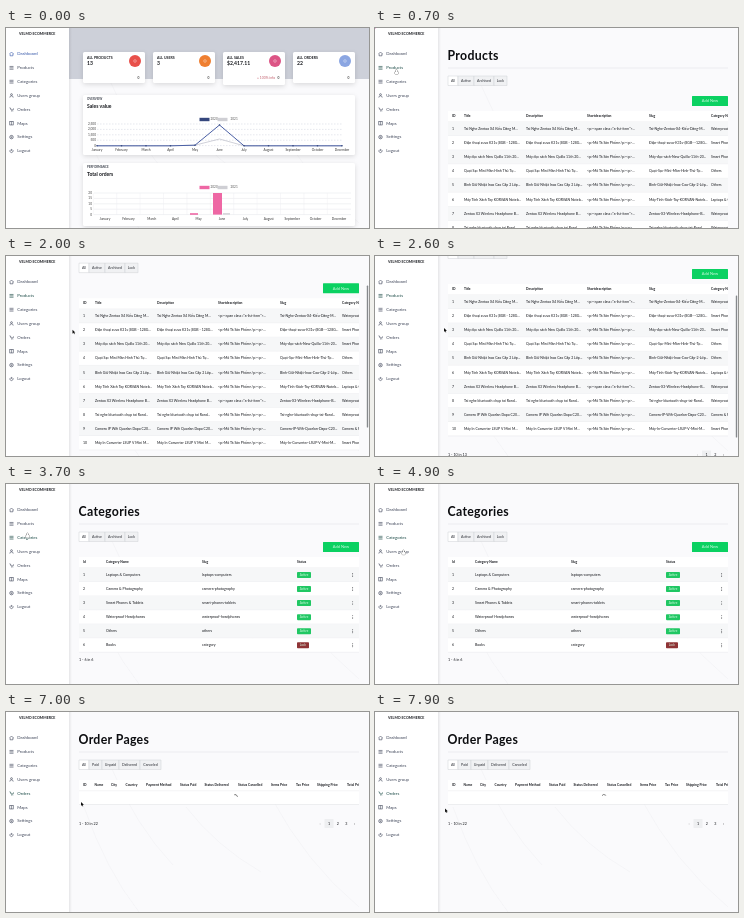
Write an HTML page with a canvas that moves like this. It is 363 px wide and 200 px high and loops after 8 s.

```html
<!DOCTYPE html>
<html lang="en">
<head>
<meta charset="utf-8">
<title>Shop admin</title>
<style>
html, body { margin: 0; height: 100%; overflow: hidden; background: #fff; }
canvas { display: block; width: 363px; height: 200px; }
</style>
</head>
<body>
<canvas id="stage"></canvas>
<script>
const LOOP = 8000, W = 363, H = 200;
const canvas = document.getElementById('stage');
const c = canvas.getContext('2d');
const dpr = window.devicePixelRatio || 1;
canvas.width = W * dpr;
canvas.height = H * dpr;

const INK = '#15171c', GREEN = '#0bd162', NAVY = '#35477d', PINK = '#ee67a4';

function text(s, x, y, size = 3.5, color = INK, weight = 400, align = 'left') {
  c.font = `${weight} ${size}px Lato, sans-serif`;
  c.fillStyle = color;
  c.textAlign = align;
  c.textBaseline = 'middle';
  c.fillText(s, x, y);
}
function box(x, y, w, h, color, r = 0) {
  c.fillStyle = color;
  c.beginPath();
  c.roundRect(x, y, w, h, r);
  c.fill();
}
function path(points, color, width = 0.5, dash = []) {
  c.strokeStyle = color;
  c.lineWidth = width;
  c.setLineDash(dash);
  c.beginPath();
  points.forEach(([x, y]) => c.lineTo(x, y));
  c.stroke();
  c.setLineDash([]);
}
function arc(x, y, r, color, width, from = 0, to = Math.PI * 2) {
  c.beginPath();
  c.arc(x, y, r, from, to);
  if (width) {
    c.strokeStyle = color;
    c.lineWidth = width;
    c.stroke();
  } else {
    c.fillStyle = color;
    c.fill();
  }
}
function panel(x, y, w, h) {
  c.shadowColor = '#0002';
  c.shadowBlur = 5 * dpr;
  c.shadowOffsetY = 1.5 * dpr;
  box(x, y, w, h, '#fff', 1.5);
  c.shadowColor = 'transparent';
}
const smooth = k => k * k * (3 - 2 * k);
const ramp = (t, from, to) => smooth(Math.min(1, Math.max(0, (t - from) / (to - from))));

function backdrop() {
  box(63, 0, 300, H, '#fafafc');
  for (const [x, y, dx, dy] of [[78, 95, 55, 105], [105, 55, 62, 98], [180, 95, 75, 65], [265, 85, 88, 110]]) {
    c.beginPath();
    c.moveTo(x, y);
    c.quadraticCurveTo(x + dx * 0.4, y + dy * 0.6, x + dx, y + dy);
    c.strokeStyle = '#f2f3f5';
    c.lineWidth = 0.7;
    c.stroke();
  }
}

const MENU = ['Dashboard', 'Products', 'Categories', 'Users group', 'Orders', 'Maps', 'Settings', 'Logout'];
function sidebar(active) {
  const shade = c.createLinearGradient(62, 0, 66, 0);
  shade.addColorStop(0, '#0000001c');
  shade.addColorStop(1, '#0000');
  box(62, 0, 4, H, shade);
  box(0, 0, 63, H, '#fff');
  text('VELMO ECOMMERCE', 13, 6, 3.6, INK, 700);
  MENU.forEach((name, i) => {
    const y = 26 + i * 13.85;
    const color = i !== active ? '#3f4659' : i ? '#1b4a46' : '#3456a8';
    icon(i, 5.5, y, color);
    text(name, 11.3, y, 4.3, color);
  });
}
function icon(i, x, y, color) {
  if (i === 0) path([[x - 2, y], [x, y - 2], [x + 2, y], [x + 1.4, y], [x + 1.4, y + 1.8], [x - 1.4, y + 1.8], [x - 1.4, y]], color, 0.6);
  else if (i === 1 || i === 2) for (const d of [-1.4, 0, 1.4]) path([[x - 2, y + d], [x + 2, y + d]], color, 0.6);
  else if (i === 3) {
    arc(x, y - 1, 0.9, color, 0.6);
    arc(x, y + 2, 1.7, color, 0.6, Math.PI, 0);
  } else if (i === 4) {
    path([[x - 2, y - 1.6], [x - 1, y - 1.4], [x - 0.5, y + 0.6], [x + 1.6, y + 0.6], [x + 2, y - 1]], color, 0.6);
    arc(x, y + 1.6, 0.4, color);
    arc(x + 1.4, y + 1.6, 0.4, color);
  } else if (i === 5) {
    c.strokeStyle = color;
    c.lineWidth = 0.6;
    c.strokeRect(x - 1.7, y - 1.7, 3.4, 3.4);
    path([[x, y - 1.7], [x, y + 1.7]], color);
  } else if (i === 6) {
    arc(x, y, 1.7, color, 0.7);
    arc(x, y, 0.6, color);
  } else {
    arc(x, y, 1.6, color, 0.6, -0.9, 4);
    path([[x, y - 2], [x, y]], color, 0.6);
  }
}

const MONTHS = 'January February March April May June July August September October December'.split(' ');
const CARDS = [
  ['ALL PRODUCTS', '13', '#e8504b'], ['ALL USERS', '3', '#ef7f31'],
  ['ALL SALES', '$2,417.11', '#dc5485'], ['ALL ORDERS', '22', '#8ba6e2']
];
function chart(y, h, kicker, title, color) {
  panel(77, y, 272, h);
  text(kicker, 81, y + 4.5, 2.9, '#3c414c', 700);
  text(title, 81, y + 11, 5, INK, 700);
  box(193.5, y + 22.8, 10, 3.4, color);
  text('2020', 204.5, y + 24.5, 3.1, '#555');
  box(211.5, y + 22.8, 10, 3.4, '#cfcfd4');
  text('2021', 224.5, y + 24.5, 3.1, '#555');
}
function dashboard() {
  box(63, 0, 300, 51, '#cdd0d9');
  CARDS.forEach(([label, value, color], i) => {
    const x = 77 + i * 70, hasTrend = i === 2;
    panel(x, 24, 62, hasTrend ? 33 : 31);
    text(label, x + 4, 29.6, 3.5, INK, 700);
    text(value, x + 4, 35, 5.1, INK, 700);
    arc(x + 52, 33, 6, color);
    arc(x + 52, 33, 1.3, '#fff8', 0.7);
    if (hasTrend) text('+ 100% info', x + 34, 49.5, 3.4, '#c25f6d');
    text('0', x + 54.5, 49.5, 3.3, '#444', 700);
  });

  chart(67, 60, 'OVERVIEW', 'Sales value', NAVY);
  ['2,500', '2,000', '1,500', '500', '0'].forEach((label, i) => {
    const y = 96 + i * 5.4;
    text(label, 90, y, 3.2, '#444', 400, 'right');
    path([[91, y], [337, y]], '#d5d8e2', 0.6, [1.5, 1.5]);
  });
  const px = i => 91 + i * 24.5;
  const line = peak => MONTHS.map((_, i) => [px(i), i === 5 ? peak : i === 4 ? 117.2 : 117.8]);
  path(line(111), '#c4c6d0', 0.8);
  path(line(97), '#4b60a5', 1);
  MONTHS.forEach((m, i) => {
    arc(px(i), line(97)[i][1], 0.8, NAVY);
    text(m, px(i), 122, 3.2, '#333', 400, 'center');
  });

  chart(135, 63, 'PERFORMANCE', 'Total orders', PINK);
  for (let i = 0; i < 5; i++) {
    const y = 165 + i * 5.4;
    text(20 - i * 5, 86, y, 3.2, '#444', 400, 'right');
    path([[88, y], [345, y]], '#e3e4e8');
  }
  MONTHS.forEach((m, i) => {
    const x = 99 + i * 23.4;
    path([[x - 11.7, 165], [x - 11.7, 187]], '#eeeff2');
    text(m, x, 191, 3.2, '#333', 400, 'center');
  });
  box(184, 185.2, 8, 1.6, PINK);
  box(207, 165, 9, 21.6, PINK);
  box(217, 185.2, 7, 1.4, '#cfcfd4');
}

function heading(title, tabs) {
  c.letterSpacing = '0.3px';
  text(title, 72.5, 28, 12.3, '#0c0d10', 700);
  c.letterSpacing = '0px';
  path([[73, 40], [353, 40]], '#dddfe3');
  tabs.forEach(([name, x, w], i) => {
    box(x, 48, w, 9.5, i ? '#f0f1f3' : '#fff');
    path([[x, 48], [x + w, 48], [x + w, 57.5], [x, 57.5], [x, 48]], '#cfd1d5');
    text(name, x + w / 2, 53, 3.6, '#292c33', 400, 'center');
  });
}
const STATES = [['All', 73, 10], ['Active', 83, 16], ['Archived', 99, 20], ['Lock', 119, 13]];
function addButton(y) {
  box(317, y, 36, 10, GREEN, 0.5);
  text('Add New', 335, y + 5.2, 4, '#d9fbe6', 400, 'center');
}
function tableHead(y, columns) {
  box(73, y - 5, 280, 11.5, '#fff');
  columns.forEach(([name, x]) => text(name, x, y, 3.3, INK, 700));
  path([[73, y + 6], [353, y + 6]], '#dcdee2');
}
function stripe(i, y) {
  box(73, y - 7, 280, 14, i % 2 ? '#fff' : '#f6f7f8');
  path([[73, y + 7], [353, y + 7]], '#e4e5e8');
  text(i + 1, 77, y, 3.5);
}
function pager(y, range, pages, x) {
  text(range, 73, y, 3.7);
  if (!pages) return;
  box(x - 4, y - 4.5, 9, 9, '#eeeff1');
  text('‹', x - 8.5, y, 4, '#888', 400, 'center');
  for (let i = 0; i < pages; i++) text(i + 1, x + 0.5 + i * 8.7, y, 3.7, INK, 400, 'center');
  text('›', x + pages * 8.7, y, 4, INK, 400, 'center');
}

const PRODUCTS = [
  ['Tai Nghe Zentoa X4 Kiểu Dáng M', 'Waterproof'],
  ['Điện thoại zuvo K31s (8GB - 128G', 'Smart Phones'],
  ['Máy đọc sách New Quillo 11th 20', 'Smart Phones'],
  ['Quạt Sạc Mini Màn Hình Thú Tự', 'Others'],
  ['Bình Giữ Nhiệt Inox Cao Cấp 2 Lớp', 'Others'],
  ['Máy Tính Xách Tay KORVAN Noteb', 'Laptops & C'],
  ['Zentoa X3 Wireless Headphone B', 'Waterproof'],
  ['Tai nghe bluetooth chụp tai Rond', 'Waterproof'],
  ['Camera IP Wifi Quorlan Dapo C20', 'Camera & P'],
  ['Máy In Converter LSUP V Mini M', 'Smart Phones']
];
function products(scroll) {
  c.save();
  c.beginPath();
  c.rect(63, 0, 290, H);
  c.clip();
  c.translate(0, -scroll);
  heading('Products', STATES);
  addButton(68);
  tableHead(88, [['ID', 77], ['Title', 89], ['Description', 151], ['Shortdescription', 212], ['Slug', 274], ['Category Name', 336]]);
  PRODUCTS.forEach(([name, category], i) => {
    const y = 101 + i * 14.1;
    stripe(i, y);
    text(name + '...', 89, y, 3.5);
    text(name + '...', 151, y, 3.5);
    text(i % 6 ? '<p>Mô Tả Sản Phẩm</p><p>...' : '<p><span class="a-list-item">...', 212, y, 3.5);
    text(name.replaceAll(' ', '-') + '...', 274, y, 3.5);
    text(category, 336, y, 3.5);
  });
  pager(254, '1 - 10 in 13', 2, 331);
  c.restore();
  if (scroll) box(360.8, 1 + scroll * 0.7, 1.4, 142, '#85888c', 0.6);
}

const CATEGORIES = ['Laptops & Computers', 'Camera & Photography', 'Smart Phones & Tablets', 'Waterproof Headphones', 'Others', 'Books'];
function categories() {
  heading('Categories', STATES);
  addButton(58);
  tableHead(78, [['Id', 77], ['Category Name', 100], ['Slug', 196], ['Status', 291]]);
  CATEGORIES.forEach((name, i) => {
    const y = 91 + i * 14.05, locked = i === 5;
    stripe(i, y);
    text(name, 100, y, 3.6);
    text(locked ? 'category' : name.toLowerCase().replace(/[ &]+/g, '-'), 196, y, 3.6);
    box(291, y - 3, locked ? 12 : 14, 6, locked ? '#8f3436' : '#20c763', 0.8);
    text(locked ? 'Lock' : 'Active', locked ? 297 : 298, y, 3.1, '#d9fbe6', 400, 'center');
    for (const d of [-1.5, 0, 1.5]) arc(346.7, y + d, 0.45, INK);
  });
  pager(176, '1 - 6 in 6');
}

function orders(t) {
  heading('Order Pages', [['All', 73, 10], ['Paid', 83, 13], ['Unpaid', 96, 17], ['Delivered', 113, 21], ['Canceled', 134, 21]]);
  c.save();
  c.beginPath();
  c.rect(73, 60, 280, 40);
  c.clip();
  tableHead(73, [
    ['ID', 77], ['Name', 88.5], ['City', 105], ['Country', 119.5], ['Payment Method', 140], ['Status Paid', 174],
    ['Status Delivered', 198.5], ['Status Cancelled', 232], ['Items Price', 265], ['Tax Price', 290],
    ['Shipping Price', 311], ['Total Price', 341]
  ]);
  box(73, 79.3, 280, 13, '#fff');
  path([[73, 92.5], [353, 92.5]], '#dcdee2');
  const turn = t / 1000 * Math.PI * 2;
  arc(229, 85, 2.4, '#444', 0.7, turn - 1.9, turn);
  c.restore();
  pager(111.5, '1 - 10 in 22', 3, 322.5);
}

// time, x, y
const POINTER = [
  [0, -8, 30], [500, 20, 40], [900, 22, 43], [1300, 39, 63], [1800, 66, 74], [2600, 69, 72], [2750, 21, 52],
  [3700, 21, 49], [4300, 22, 56], [4900, 28, 66], [5150, 22, 81], [5500, 24, 83], [6300, 70, 92],
  [7000, 75, 90], [7900, 70, 96.5], [8000, 70, 97]
];
function pointer(t) {
  const n = POINTER.findIndex(p => p[0] > t);
  const [t0, x0, y0] = POINTER[n - 1], [t1, x1, y1] = POINTER[n];
  const k = ramp(t, t0, t1);
  const x = x0 + (x1 - x0) * k, y = y0 + (y1 - y0) * k;
  c.save();
  c.translate(x, y);
  c.beginPath();
  if (x < 55) {
    c.roundRect(-0.2, 0, 1.2, 3, 0.6);
    c.roundRect(-1.2, 2, 3.6, 2.7, 1);
    c.fillStyle = '#fff';
    c.strokeStyle = '#222';
  } else {
    [[0, 0], [0, 4], [1, 3.1], [1.7, 4.6], [2.3, 4.3], [1.7, 2.9], [2.9, 2.8]].forEach(p => c.lineTo(...p));
    c.closePath();
    c.fillStyle = '#111';
    c.strokeStyle = '#fff';
  }
  c.lineWidth = 0.5;
  c.stroke();
  c.fill();
  c.restore();
}

function draw(now) {
  const t = now % LOOP;
  const page = t < 700 ? 0 : t < 2700 ? 1 : t < 5250 ? 2 : 4;
  c.setTransform(dpr, 0, 0, dpr, 0, 0);
  c.clearRect(0, 0, W, H);
  backdrop();
  if (page === 0) dashboard();
  else if (page === 1) products(55 * ramp(t, 1600, 2200));
  else if (page === 2) categories();
  else orders(t);
  sidebar(page);
  if (t >= 700 && t < 1550) box(0, 0, Math.min(W, 300 * (t - 700) / 600), 1, '#f08ad0');
  pointer(t);
  requestAnimationFrame(draw);
}
requestAnimationFrame(draw);
</script>
</body>
</html>
```
